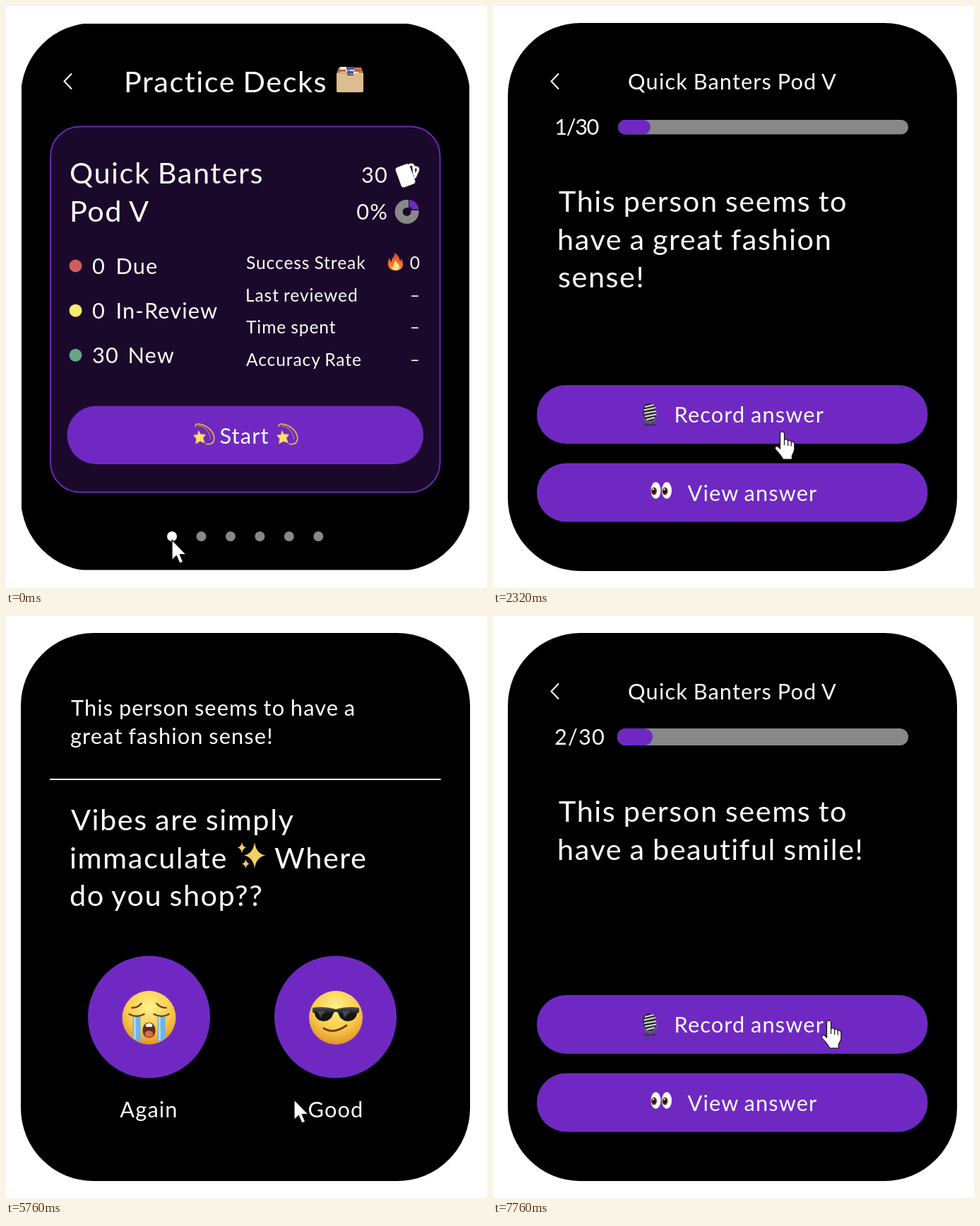
These frames come from a looping animation (681 px wide and 823 px high, 8000 ms). An HTML page:

```html
<!DOCTYPE html>
<html lang="en">
<head>
<meta charset="utf-8">
<title>Practice decks</title>
<style>
  html, body { margin: 0; width: 100%; height: 100%; overflow: hidden; background: #fff; }
  svg { display: block; width: 681px; height: 823px; }
  text { font-family: Lato, "Open Sans", sans-serif; fill: #fff; letter-spacing: .038em; word-spacing: -.045em; white-space: pre; }
  .big { font-size: 41.4px; }
  .mid { font-size: 30.7px; }
  .small { font-size: 24.5px; }
  .count { letter-spacing: -.045em; }
  .end { text-anchor: end; }
  .center { text-anchor: middle; }
  .purple { fill: #6f29c2; }
  .grey { fill: #888; }
  .line { fill: none; stroke: #fff; stroke-width: 2; }
</style>
</head>
<body>
<svg viewBox="0 0 681 823">
  <defs>
    <clipPath id="inset"><rect x="22" y="25" width="634" height="772.5"/></clipPath>
    <radialGradient id="skin" cx=".5" cy=".3" r=".75">
      <stop offset="0" stop-color="#fff08a"/><stop offset=".55" stop-color="#fbcb4b"/><stop offset="1" stop-color="#dc8a25"/>
    </radialGradient>
    <linearGradient id="fire" x2="0" y2="1">
      <stop offset="0" stop-color="#e2412b"/><stop offset="1" stop-color="#f9932d"/>
    </linearGradient>
    <linearGradient id="lens" x2="0" y2="1">
      <stop offset="0" stop-color="#555"/><stop offset=".5" stop-color="#151515"/>
    </linearGradient>
    <path id="back" class="line" d="M93 95.5 82.5 106.5 93 117.5"/>
    <g id="dizzy">
      <path d="M4 5C2 0 10 0 18 4 27 9 33 19 29 26 27 30 21 30 18 29" fill="none" stroke="#e3b94f" stroke-width="1.7"/>
      <path d="M7 4C16 3 25 13 25 23" fill="none" stroke="#b98c3d" stroke-width="1.2"/>
      <path d="M8 10 11 15.5 18 16 14.500 21 17 28 10.500 25.500 4 29 5 22 1 17 7 16Z" fill="#fbdf73" stroke="#dfa83e" stroke-width=".8"/>
    </g>
    <path id="spark" d="M0-1Q.12-.12 1 0 .12.12 0 1-.12.12-1 0-.12-.12 0-1Z" fill="#f8cf63"/>
    <g id="eye">
      <ellipse rx="7" ry="11.8" fill="#fff"/>
      <ellipse cx="-2.5" cy="1" rx="4" ry="5.5" fill="#6b3a20"/>
      <ellipse cx="-2.8" cy="1" rx="2.3" ry="3.5" fill="#1a0d08"/>
      <circle cx="-3.5" cy="-1.5" r="1.2" fill="#fff"/>
    </g>
  </defs>

  <rect id="watch" x="21" y="24" width="636" height="775" rx="103"/>

  <g id="deck">
    <use href="#back"/>
    <text class="big" x="167" y="121.5">Practice Decks</text>
    <g>
      <path d="M471 87H503L506 97H468Z" fill="#b98f62"/>
      <path d="M473 86h10v8h-10zM487 89h12v8h-12z" fill="#eee5da"/>
      <path d="M482 86h11v4h-11zM483 92h9v4h-9z" fill="#4d50bd"/>
      <path d="M493 89h10v4h-10zM470 90h11v3h-11z" fill="#d95645"/>
      <path d="M468 95H482L484 98H492L494 95H506V120Q506 122 504 122H470Q468 122 468 120Z" fill="#dcbc90"/>
    </g>
    <rect x="63" y="170.5" width="551.5" height="517" rx="42" fill="#1b092c" stroke="#6927b5" stroke-width="2"/>
    <text class="big" x="90" y="251">Quick Banters</text>
    <text class="big" x="90" y="305">Pod V</text>
    <text class="mid end" x="541" y="250">30</text>
    <text class="mid end" x="541" y="302">0%</text>
    <rect x="555" y="225" width="21" height="30" rx="4" fill="#fff" transform="rotate(-20 565 240)"/>
    <path class="line" style="stroke-width:3.5;stroke-linecap:round" d="M572 224.5Q577 223 577 228L578 238M579 228Q585 228 583 233L579 242"/>
    <circle class="line" cx="567.5" cy="291" r="11.5" style="stroke:#888;stroke-width:11"/>
    <path d="M570 272V289H586V272Z" fill="#1b092c"/>
    <path class="purple" d="M571 274A15 15 0 0 1 584.5 287.5H575Q574 284.5 571 283.5Z"/>

    <circle cx="98.5" cy="367.5" r="9" fill="#cd5f5b"/>
    <circle cx="98.5" cy="430.7" r="9" fill="#f8eb70"/>
    <circle cx="98.5" cy="493.8" r="9" fill="#67a785"/>
    <g class="mid">
      <text x="122" y="379">0</text><text x="155.5" y="379">Due</text>
      <text x="122" y="442">0</text><text x="155.5" y="442">In-Review</text>
      <text x="122" y="505">30</text><text x="172.5" y="505">New</text>
    </g>
    <g class="small">
      <text x="340" y="372">Success Streak</text>
      <text x="339" y="417.5">Last reviewed</text>
      <text x="340" y="463">Time spent</text>
      <text x="340" y="508.5">Accuracy Rate</text>
      <g class="end">
        <text x="587" y="372">0</text>
        <text x="587" y="417.5">–</text>
        <text x="587" y="463">–</text>
        <text x="587" y="508.5">–</text>
      </g>
    </g>
    <path d="M550 349C557 353 557 358 558 361Q560 359 559 356C564 364 563 374 552 374 540 374 539 364 543 356Q544 361 546 362C545 356 551 355 550 349Z" fill="url(#fire)"/>
    <path d="M552 359C552 364 557 364 557 369 557 376 546 375 546 368Q547 370 549 369 548 364 552 359Z" fill="#fde283"/>

    <rect class="purple" x="86.5" y="565.5" width="504.5" height="82.5" rx="41.2"/>
    <use href="#dizzy" x="264.5" y="590"/>
    <text class="mid" x="302.5" y="618.5">Start</text>
    <use href="#dizzy" x="382.5" y="590"/>
    <g id="dots"></g>
  </g>

  <g id="question">
    <use href="#back"/>
    <text class="mid center" x="339" y="118">Quick Banters Pod V</text>
    <g id="first">
      <text class="mid count end" x="149" y="182">1/30</text>
      <rect class="grey" x="177" y="161" width="411" height="20.5" rx="10.2"/>
      <rect class="purple" x="177" y="161" width="46" height="20.5" rx="10.2"/>
      <text class="big" x="91" y="344.5">have a great fashion</text>
      <text class="big" x="92" y="398">sense!</text>
    </g>
    <g id="second">
      <text class="mid end" x="159" y="182">2/30</text>
      <rect class="grey" x="176" y="159" width="412" height="24" rx="12"/>
      <rect class="purple" x="176" y="159" width="50" height="24" rx="12"/>
      <text class="big" x="91" y="344.5">have a beautiful smile!</text>
    </g>
    <text class="big" x="93" y="291">This person seems to</text>
    <rect class="purple" x="62" y="536" width="553.5" height="83" rx="41.5"/>
    <rect class="purple" x="62" y="646.5" width="553.5" height="83" rx="41.5"/>
    <g>
      <path d="M214 577Q213 588 222 588 232 588 231 575M222 588v4" fill="none" stroke="#666" stroke-width="2"/>
      <path d="M213 591h18v2.500h-18z" fill="#3a3a3a"/>
      <rect x="212.5" y="562" width="18" height="25" rx="8.5" fill="#292b2d" transform="rotate(-6 221 574)"/>
      <path d="M215 567 227.500 564M213.500 571.500 230 568M214 576 231 573M215 580.500 231 577.500M217 585 229 582" stroke="#dadcda" stroke-width="2.2"/>
    </g>
    <text class="mid" x="256.5" y="588.5">Record answer</text>
    <use href="#eye" x="230.5" y="685"/>
    <use href="#eye" x="246" y="685"/>
    <text class="mid" x="275.5" y="699.5">View answer</text>
  </g>

  <g id="answer">
    <text class="mid" x="92" y="140.5">This person seems to have a</text>
    <text class="mid" x="91" y="180.5">great fashion sense!</text>
    <path class="line" d="M62 231H615.5"/>
    <text class="big" x="92" y="303">Vibes are simply</text>
    <text class="big" x="90" y="357">immaculate</text>
    <use href="#spark" transform="translate(352 338.5) scale(15.5 19)"/>
    <use href="#spark" transform="translate(334 327.5) scale(6.5 8)"/>
    <use href="#spark" transform="translate(339.5 350.5) scale(5.5 7)"/>
    <text class="big" x="380" y="357">Where</text>
    <text class="big" x="90" y="410">do you shop??</text>
    <circle class="purple" cx="202.5" cy="567" r="86.5"/>
    <circle class="purple" cx="466.5" cy="567" r="86.5"/>
    <g transform="translate(202.5 568)">
      <circle r="38" fill="url(#skin)"/>
      <path d="M-23-3H-12V34Q-18 33-23 29ZM12-3H23V29Q18 33 12 34Z" fill="#6eb4e8"/>
      <path d="M-20-2V30M15-2V32" stroke="#a5d8f5" stroke-width="3"/>
      <path d="M-28-5Q-18 1-7-5M28-5Q18 1 7-5M-24-14Q-16-14-11-20M24-14Q16-14 11-20" fill="none" stroke="#70401d" stroke-width="2.5" stroke-linecap="round"/>
      <path d="M-9 18C-9 3 9 3 9 18 9 32-9 32-9 18Z" fill="#60301c"/>
      <path d="M-5 10Q0 5 5 10L4 13H-4Z" fill="#fff"/>
      <ellipse cy="23" rx="6" ry="4.5" fill="#d86952"/>
    </g>
    <g transform="translate(467 568)">
      <circle r="38" fill="url(#skin)"/>
      <path d="M-33-14Q-17-17 0-12 17-17 33-14V-8L30-6C28 8 8 9 4-5L2-8H-2L-4-5C-8 9-28 8-30-6L-33-8Z" fill="url(#lens)"/>
      <path d="M-26-9-15-9-22 0M9-9 20-9 12 0" fill="#777" opacity=".5"/>
      <path d="M-17 15Q-3 24 15 11" fill="none" stroke="#70401d" stroke-width="3" stroke-linecap="round"/>
    </g>
    <text class="mid center" x="202.5" y="708.5">Again</text>
    <text class="mid center" x="467" y="708.5">Good</text>
  </g>

  <g id="cursor" fill="#fff" stroke="#111" stroke-width="1.2" stroke-linejoin="round">
    <path id="arrow" d="M0 0V28.500L6.300 22.500 11 33 15.600 31 11.200 20.500H20Z"/>
    <g id="hand">
      <path d="M-1.500 2a3 3 0 0 1 6 0V11c1.500-2 4.700-1.500 5.100 1 1.500-1.600 4.200-1 4.600 1.500 2-1.200 4.600 0 4.600 2.500v8c0 4-3 6-3.500 9v5H2.500c-2-5-6-8.500-10-13.500-3-4 1-6 3.500-4l2.500 2.500z"/>
      <path d="M4.500 11v7M9.600 12v7M14.200 13.500v6" fill="none"/>
    </g>
  </g>
</svg>
<script>
const LOOP = 8000, OPEN_DECK = 2320, SHOW_ANSWER = 5760, NEXT_CARD = 7120;
const $ = id => document.getElementById(id);
const show = (id, visible) => { $(id).style.display = visible ? "" : "none"; };

// Each move: start time, end time, destination.
const origin = [235, 755];
const moves = [
  [80, 1120, [408, 603]],
  [4640, 5280, [408, 684]],
  [5920, 6640, [474, 573]]
];

$("dots").innerHTML = Array.from({ length: 6 }, (_, i) =>
  `<circle cx="${235 + i * 41.45}" cy="750" r="7" fill="${i ? "#888" : "#fff"}"/>`).join("");

function cursorAt(t) {
  let point = origin;
  for (const [start, end, target] of moves) {
    const k = Math.min(1, Math.max(0, (t - start) / (end - start)));
    const eased = k * k * (3 - 2 * k);
    point = point.map((v, i) => v + (target[i] - v) * eased);
  }
  return point;
}

function isOverButton(screen, y) {
  if (screen === "deck") return y > 566 && y < 648;
  if (screen === "answer") return false;
  return (y > 536 && y < 619) || (y > 647 && y < 729);
}

function draw(t) {
  const screen = t < OPEN_DECK ? "deck" : t >= SHOW_ANSWER && t < NEXT_CARD ? "answer" : "question";
  for (const id of ["deck", "question", "answer"]) show(id, id === screen);
  show("first", t < NEXT_CARD);
  show("second", t >= NEXT_CARD);
  $("watch").setAttribute("clip-path", screen === "deck" ? "url(#inset)" : "none");

  const [x, y] = cursorAt(t);
  const pointing = isOverButton(screen, y);
  show("hand", pointing);
  show("arrow", !pointing);
  $("cursor").setAttribute("transform", `translate(${x} ${y})`);
}

const began = performance.now();
function tick() {
  draw((performance.now() - began) % LOOP);
  requestAnimationFrame(tick);
}
tick();
</script>
</body>
</html>
```
